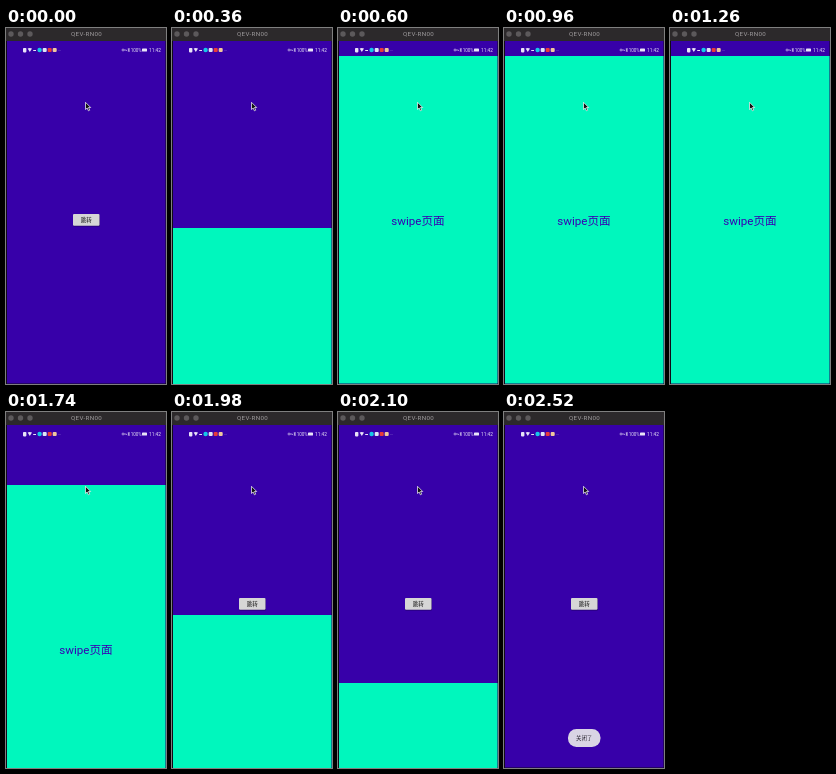
These frames come from a looping animation (160 px wide and 356 px high, 2580 ms). An HTML page:

```html
<!DOCTYPE html>
<html lang="zh">
<head>
<meta charset="utf-8">
<style>
  html, body { margin: 0; width: 100%; height: 100%; overflow: hidden; background: #100a18; }
  svg { display: block; width: 160px; height: 356px; }
  text { font-family: Roboto, "Noto Sans CJK SC", "Noto Sans CJK", sans-serif; text-anchor: middle; }
</style>
</head>
<body>
<svg viewBox="0 0 160 356">
  <rect x="1" y="13" width="158.5" height="342.5" fill="#3700a9"/>

  <g id="button">
    <rect x="67" y="186.6" width="27" height="12" rx="1" fill="#22006c"/>
    <rect x="67" y="186" width="26.5" height="11.8" rx="1" fill="#d6d6d6"/>
    <text x="80.3" y="194" font-size="5.5" font-weight="500" fill="#181818">跳转</text>
  </g>

  <g id="panel">
    <rect x="1" y="28" width="158.5" height="327.5" fill="#00f7bd"/>
    <text x="80" y="197" font-size="11.6" fill="#3700b3">swipe页面</text>
  </g>

  <g id="toast">
    <rect x="64" y="317" width="32.5" height="18" rx="8.5" fill="#d9d4e4"/>
    <text x="80.2" y="328.2" font-size="5.4" fill="#25202c">关闭了</text>
  </g>

  <g id="status" fill="#e9e3f7">
    <rect x="17" y="20" width="3.4" height="4.4" rx=".8"/>
    <path d="M21.6 20.6q2.2-1.4 4.4 0l-2.2 3.4z"/>
    <rect x="27.2" y="22" width="2.8" height="1"/>
    <circle cx="33.6" cy="22" r="2.2" fill="#16c7e8"/>
    <rect x="36.7" y="19.9" width="4" height="4.2" rx="1" fill="#dfe6f5"/>
    <rect x="41.7" y="19.9" width="4" height="4.2" rx="1" fill="#e83a3a"/>
    <rect x="46.7" y="19.9" width="4" height="4.2" rx="1" fill="#f0c79c"/>
    <text x="53.7" y="23" font-size="4">…</text>
    <circle cx="117" cy="22" r="1" fill="none" stroke="#e9e3f7" stroke-width=".6"/>
    <path d="M118 22h2.4v1" fill="none" stroke="#e9e3f7" stroke-width=".6"/>
    <path d="M121.7 20.8l2 2.2-1 1v-4l1 1-2 2.2" fill="none" stroke="#e9e3f7" stroke-width=".5"/>
    <text x="130.2" y="23.7" font-size="4.6">100%</text>
    <rect x="136" y="20.4" width="5" height="3.2" rx=".7"/>
    <text x="149" y="23.8" font-size="4.8">11:42</text>
  </g>

  <g id="titlebar">
    <rect width="160" height="13" fill="#2c292b"/>
    <g fill="#5c595b">
      <circle cx="5" cy="6" r="2.7"/>
      <circle cx="14.5" cy="6" r="2.7"/>
      <circle cx="24" cy="6" r="2.7"/>
    </g>
    <text x="80.5" y="8.2" font-size="6.2" letter-spacing=".3" fill="#a09d9f">QEV-RN00</text>
  </g>

  <path d="M79.5 74.3v7.2l1.7-1.5 1.2 2.8 1.3-.6-1.2-2.7h2.2z"
        fill="#111" stroke="#fff" stroke-width=".7"/>
</svg>
<script>
const LOOP = 2580, STEP = 60, TRAVEL = 328;
const OPEN = [270, 596], CLOSE = [1549, 2375], TOAST = [2385, 2490];
const part = id => document.getElementById(id);
const progress = (t, [from, to]) => Math.min(1, Math.max(0, (t - from) / (to - from)));
const smooth = p => p * p * (3 - 2 * p);

function draw(t) {
  const remaining = (1 - progress(t, OPEN)) ** 2;
  const offset = TRAVEL * (remaining + smooth(progress(t, CLOSE)));
  part('panel').setAttribute('transform', `translate(0 ${Math.round(offset)})`);
  part('button').style.display = t > OPEN[0] && t < CLOSE[0] ? 'none' : '';
  part('toast').style.opacity = progress(t, TOAST);
}

const start = performance.now();
function tick() {
  const t = (performance.now() - start) % LOOP;
  draw(Math.floor(t / STEP) * STEP);
  requestAnimationFrame(tick);
}
tick();
</script>
</body>
</html>
```
